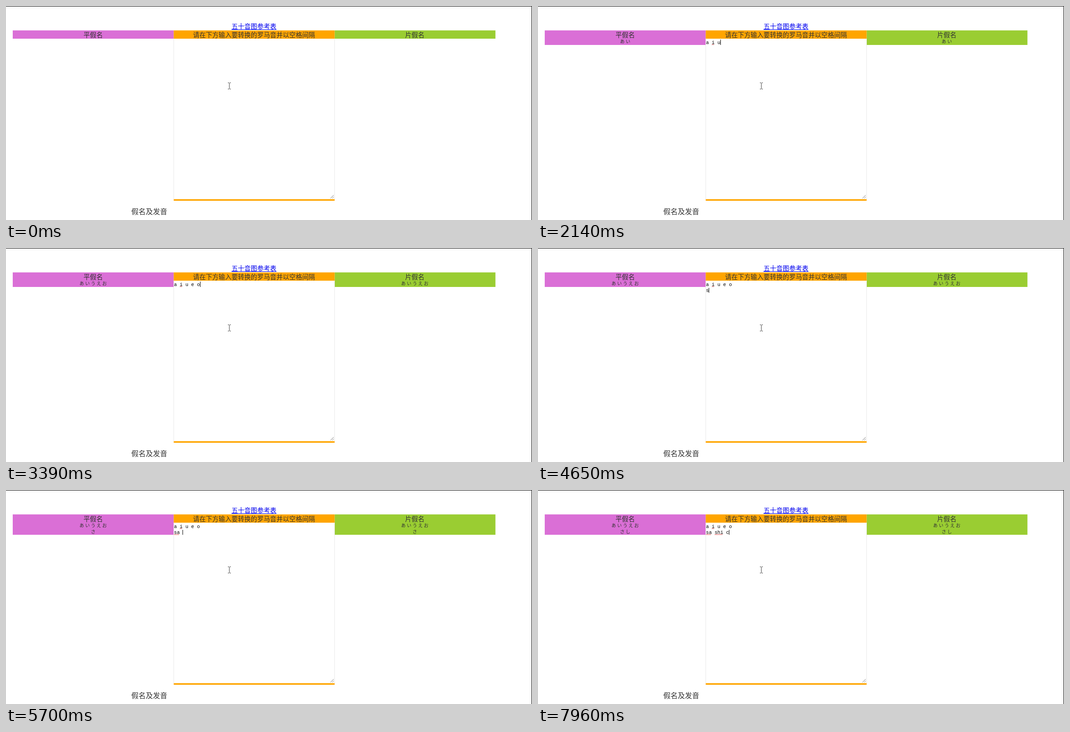
An HTML page that plays this animation: 1171x478 px, repeating every 8 s.

```html
<!DOCTYPE html>
<html lang="zh-CN">
<head>
<meta charset="utf-8">
<title>Kana converter</title>
<style>
  html, body { margin: 0; width: 100%; height: 100%; overflow: hidden; background: #fff; }
  svg { display: block; }
  text { font: 14.3px "Noto Sans CJK SC", sans-serif; fill: #333; text-anchor: middle; }
  .kana { font: 10.2px "Noto Sans CJK JP", sans-serif; word-spacing: .25px; }
  .typed { font: 10.667px "Liberation Mono", monospace; fill: #000; text-anchor: start; white-space: pre; }
  .wave { fill: none; stroke: #e03030; stroke-width: .9; }
  .line { fill: none; stroke: #333; stroke-width: 1; }
</style>
</head>
<body>
<svg id="stage" width="1171" height="478" viewBox="0 0 1171 478">
  <path d="M0 .5H1170.5V478" fill="none" stroke="#000"/>
  <text x="552" y="51" style="fill:#0000ee">五十音图参考表</text>
  <rect x="502" y="52" width="100" height="1" fill="#0000ee"/>

  <rect class="panel" x="15" y="54.5" width="358.4" fill="#da6fd6"/>
  <rect class="panel" x="731.6" y="54.5" width="358" fill="#9acd32"/>
  <rect x="373.4" y="54.5" width="358.2" height="18.5" fill="#ffa500"/>
  <path d="M373.5 73V431.5M731.5 73V431.5" stroke="#e8e8e8"/>
  <rect x="373.4" y="431.5" width="358.2" height="3.5" fill="#ffa500"/>
  <path d="M722.5 429.5L729.5 422.5M726.5 429.5L729.5 426.5" stroke="#666" stroke-width=".9"/>

  <text x="194" y="70">平假名</text>
  <text x="552" y="70">请在下方输入要转换的罗马音并以空格间隔</text>
  <text x="910" y="70">片假名</text>
  <text x="319" y="464.5" style="font-size:16px">假名及发音</text>

  <path class="line" d="M494 171.5H496.5M498 171.5H500.5M497.2 172V185M494 185.5H496.5M498 185.5H500.5"/>
  <rect id="caret" width="1" fill="#000"/>
</svg>
<script>
const LOOP = 8000, LEFT = 374, CELL = 6.4;
const stage = document.getElementById("stage");
const caret = document.getElementById("caret");
const panels = document.querySelectorAll(".panel");

// Each step changes some of: typed lines, kana lines, panel bottom, caret, spelling marks
const steps = [
  [0, { typed: [""], kana: [], bottom: 73, caret: false, marks: 0 }],
  [200, { caret: true }],
  [730, { typed: ["a"] }],
  [810, { kana: ["あ"], bottom: 87 }],
  [1090, { typed: ["a "] }],
  [1290, { typed: ["a i"] }],
  [1370, { kana: ["あ い"] }],
  [1620, { typed: ["a i "], marks: 1 }],
  [2140, { typed: ["a i u"] }],
  [2220, { kana: ["あ い う"] }],
  [2300, { typed: ["a i u "] }],
  [2590, { typed: ["a i u e"] }],
  [2670, { kana: ["あ い う え"] }],
  [2830, { typed: ["a i u e "] }],
  [3230, { typed: ["a i u e o"] }],
  [3310, { kana: ["あ い う え お"] }],
  [3840, { typed: ["a i u e o", ""] }],
  [4360, { caret: false }],
  [4650, { typed: ["a i u e o", "s"], caret: true }],
  [4810, { bottom: 100 }],
  [5170, { typed: ["a i u e o", "sa"] }],
  [5250, { kana: ["あ い う え お", "さ"] }],
  [5620, { typed: ["a i u e o", "sa "], marks: 2 }],
  [6140, { typed: ["a i u e o", "sa s"] }],
  [6300, { typed: ["a i u e o", "sa sh"] }],
  [6460, { typed: ["a i u e o", "sa shi"] }],
  [6540, { kana: ["あ い う え お", "さ し"] }],
  [7030, { typed: ["a i u e o", "sa shi "], marks: 3 }],
  [7560, { caret: false }],
  [7960, { typed: ["a i u e o", "sa shi c"], caret: true }]
];

function add(tag, attrs) {
  const el = document.createElementNS(stage.namespaceURI, tag);
  for (const key in attrs) el.setAttribute(key, attrs[key]);
  return stage.appendChild(el);
}

const rowTexts = (cls, x, y) => [0, 13.3].map(dy => add("text", { class: cls, x, y: y + dy }));
const typedRows = rowTexts("typed", LEFT, 85);
const kanaColumns = [194, 910].map(x => rowTexts("kana", x, 83.2));

function wave(row, from, to) {
  const end = LEFT + to * CELL;
  let x = LEFT + from * CELL, d = "", up = false;
  for (; x <= end; x += 1.6, up = !up) {
    d += (d ? "L" : "M") + x + " " + ((up ? 85.6 : 87) + row * 13.2);
  }
  return add("path", { class: "wave", d });
}
const waves = [wave(0, 2, 3), wave(1, 0, 2), wave(1, 3, 6)];

function show(state) {
  const row = state.typed.length - 1;
  typedRows.forEach((el, i) => el.textContent = state.typed[i] || "");
  kanaColumns.forEach(rows => rows.forEach((el, i) => el.textContent = state.kana[i] || ""));
  panels.forEach(el => el.setAttribute("height", state.bottom - 54.5));
  waves.forEach((el, i) => el.style.display = i < state.marks ? "" : "none");
  caret.style.display = state.caret ? "" : "none";
  caret.setAttribute("x", Math.round(LEFT + state.typed[row].length * CELL));
  caret.setAttribute("y", row ? 89 : 75);
  caret.setAttribute("height", row ? 11 : 12);
}

const start = performance.now();
let shown = -1;
function tick() {
  const t = (performance.now() - start) % LOOP;
  const count = steps.filter(([at]) => at <= t).length;
  if (count !== shown) {
    shown = count;
    show(Object.assign({}, ...steps.slice(0, count).map(step => step[1])));
  }
  requestAnimationFrame(tick);
}
tick();
</script>
</body>
</html>
```
